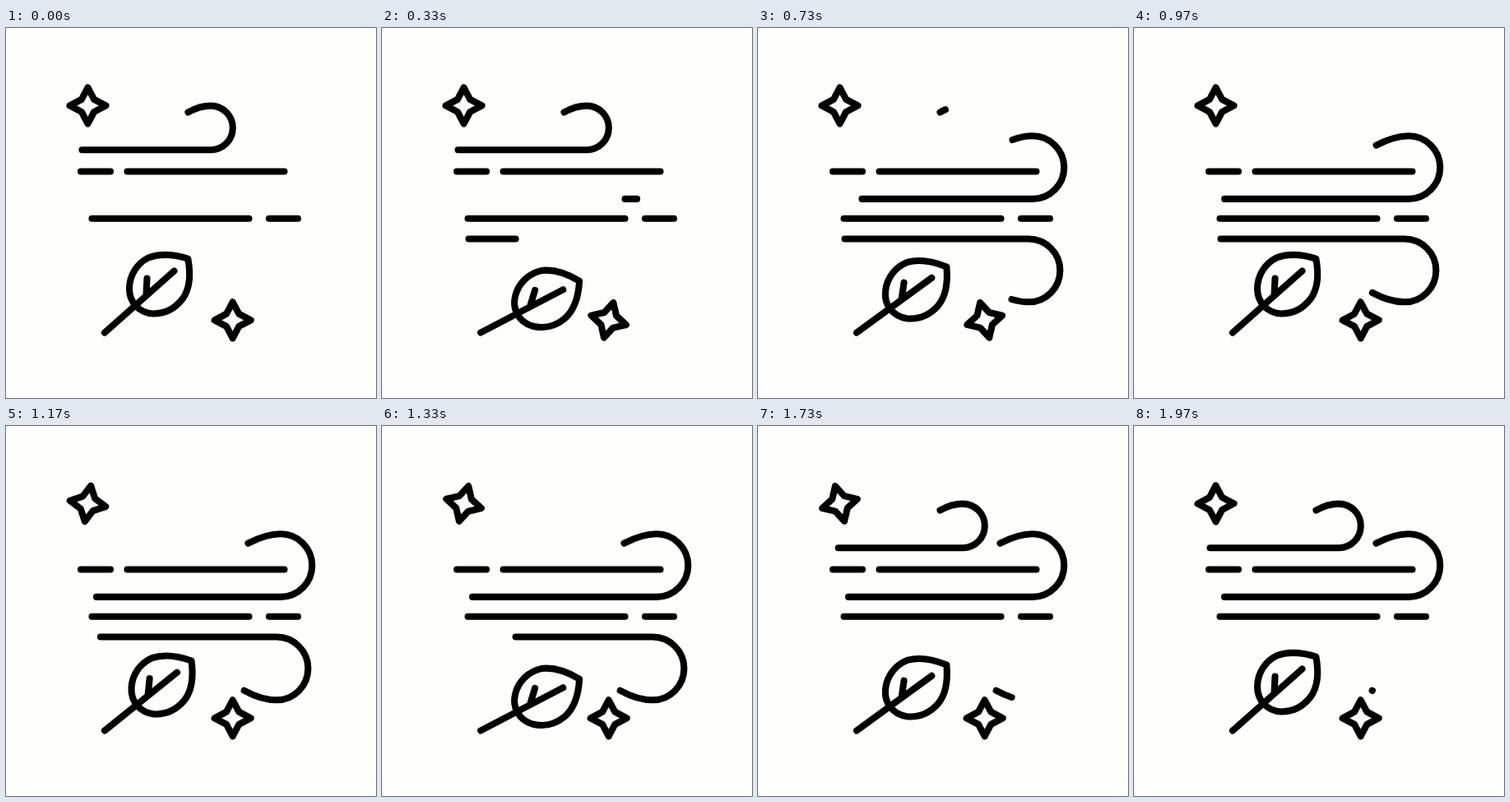
Recreate the animation shown at these times as an HTML page. Size 450 px wide and 450 px high, loop 2010 ms.

```html
<!DOCTYPE html>
<html lang="en">
<head>
<meta charset="utf-8">
<title>Wind and leaf</title>
<style>
  html, body { margin: 0; width: 100%; height: 100%; overflow: hidden; background: #fefefc; }
  svg { display: block; width: 100vw; height: 100vh; }
  svg * { fill: none; stroke: #000; stroke-width: 8.1; stroke-linecap: round; stroke-linejoin: round; }
</style>
</head>
<body>
<svg viewBox="0 0 450 450">
  <defs>
    <path id="star" d="M0-22L7.6-7.6L22 0L7.6 7.6L0 22L-7.6 7.6L-22 0L-7.6-7.6Z"/>
  </defs>
  <path d="M91 174.500H127M147.500 174.500H338.500M104.500 231.800H295.500M320 231.800H355"/>
  <path id="top" pathLength="1" d="M92.500 148.200H249a26.800 26.800 0 0 0 0-53.600C239 94.600 229.500 98 221.500 102.500"/>
  <path id="mid" pathLength="1" d="M110 207.900H334a38.300 38.300 0 0 0 0-76.600C320 131.300 306.500 136.500 294.500 142.700"/>
  <path id="low" pathLength="1" d="M105.500 256.500H329a38.400 38.400 0 0 1 0 76.800C315 333.300 301.500 328.300 289.700 321.800"/>
  <g id="leaf">
    <path d="M221.300 280.500C224 295 225 315 215 329C206 341 193 347.500 179 347.500C162 346.500 150 334 150 317C150 300 160 286 173 279.500C187 274 205 275.500 221.300 280.500Z"/>
    <path d="M120 370.500L204.500 295.500M171.500 304.500L170.500 325"/>
  </g>
  <use id="star1" href="#star"/>
  <use id="star2" href="#star"/>
</svg>
<script>
const LOOP = 2010, STEPS = 60, STEP_MS = 100 / 3;
const el = id => document.getElementById(id);

// cubic-bezier(.7, 0, .2, 1), solved by bisection
function ease(x) {
  if (x <= 0) return 0;
  if (x >= 1) return 1;
  let lo = 0, hi = 1;
  for (let i = 0; i < 30; i++) {
    const s = (lo + hi) / 2, r = 1 - s;
    if (2.1 * r * r * s + 0.6 * r * s * s + s * s * s < x) lo = s; else hi = s;
  }
  return lo * lo * (3 - 2 * lo);
}

// keys: [step, value] pairs in order, eased between neighbours
function track(keys, n) {
  let value = keys[0][1];
  for (let i = 1; i < keys.length; i++) {
    const [a, from] = keys[i - 1], [b, to] = keys[i];
    if (n >= a) value = from + (to - from) * ease((n - a) / (b - a));
  }
  return value;
}

const keys = {
  topStart: [[10, 0], [25, 1], [40, 1], [54.5, 0]],
  midSpread: [[5, 0], [30, 0.5]],
  lowStart: [[30, 0], [60, 1]],
  lowEnd: [[0, 0], [30, 1]],
  leaf: [[0, 0], [14, 15], [30, 0], [44, 15], [60, 0]],
  star: [[0, 0], [10, 15], [24, -15], [30, 0]]
};

function trim(id, start, end) {
  const path = el(id), length = end - start;
  path.style.visibility = length > 0.0005 ? "visible" : "hidden";
  path.setAttribute("stroke-dasharray", `${length} 2`);
  path.setAttribute("stroke-dashoffset", -start);
}

function turnStar(id, x, y, angle) {
  el(id).setAttribute("transform", `translate(${x} ${y}) rotate(${angle})`);
}

function draw(n) {
  const spread = track(keys.midSpread, n);
  trim("top", track(keys.topStart, n), 1);
  trim("mid", 0.5 - spread, 0.5 + spread);
  trim("low", track(keys.lowStart, n), track(keys.lowEnd, n));
  el("leaf").setAttribute("transform", `rotate(${track(keys.leaf, n)} 120 370.5)`);
  turnStar("star1", 99.5, 94.4, track(keys.star, n - 30));
  turnStar("star2", 275.7, 355.3, track(keys.star, n));
}

const begin = performance.now();
function tick() {
  const t = (performance.now() - begin) % LOOP;
  draw(Math.min(STEPS - 1, Math.floor((t + 5) / STEP_MS)));
  requestAnimationFrame(tick);
}
tick();
</script>
</body>
</html>
```
